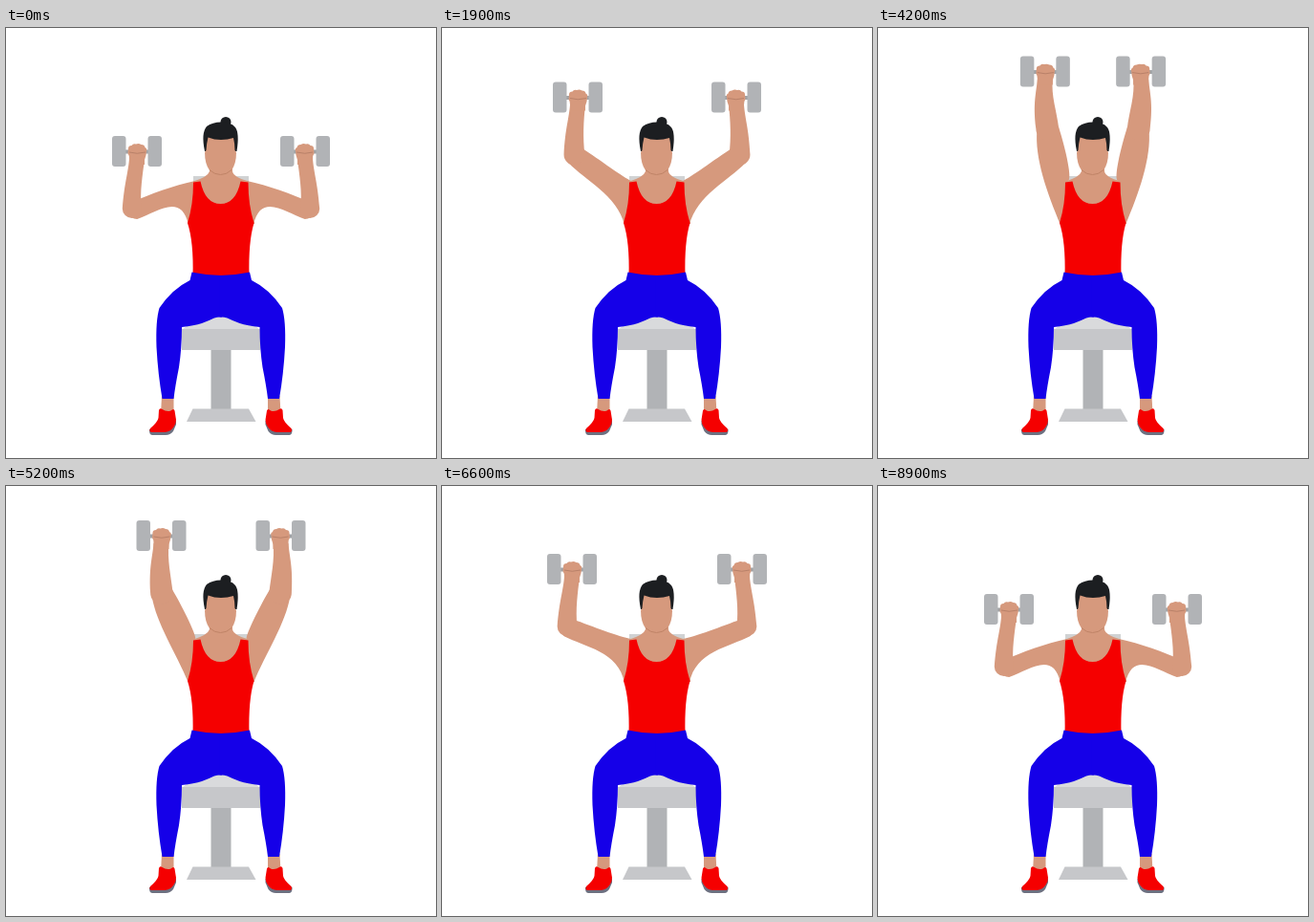
An HTML page for the animation above (9000 ms loop, 450 by 450 pixels).

```html
<!DOCTYPE html>
<html lang="en">
<head>
<meta charset="utf-8">
<title>Seated shoulder press</title>
<style>
  html, body { margin: 0; width: 100%; height: 100%; overflow: hidden; background: #fff; }
  svg { display: block; width: 100vw; height: 100vh; }
  .skin { fill: #d6997d; }
  .red { fill: #f50000; }
  .blue { fill: #1500e8; }
  .hair { fill: #1c1e21; }
  .pale { fill: #d9dadc; }
  .grey { fill: #c6c7ca; }
  .steel { fill: #b1b3b6; }
</style>
</head>
<body>
<svg viewBox="0 0 450 450">
  <defs>
    <g id="leg">
      <path class="skin" d="M163 385H175.500V404H162Z"/>
      <path fill="#6d7080" d="M150 420Q149.500 425.500 153 426H167Q172 426 175 422L178 415V411L165 414Z"/>
      <path class="red" d="M160 400Q161 397 163.500 399Q168 402 172.500 400.500Q175.500 397.500 176.500 400.500L178 410Q178 414 175.500 417.500Q172 422.500 166 423H152Q149.500 422 151 419Q159 412 159.500 408Z"/>
      <path class="blue" d="M226 259Q209 258.500 194.500 255.500L192.500 264Q174 273 160.500 293Q156.500 306 157.500 334Q159 362 163.500 388H175.500Q177 375 181 355Q184 335 184 313Q197 311.500 205 309Q213 306 218 303.500Q222 302 226 302.500Z"/>
    </g>
    <g id="arm">
      <path id="upper" class="skin"/>
      <g id="lower">
        <rect x="-13" y="-1.500" width="26" height="4" fill="#a0a2a5"/>
        <rect class="steel" x="-26" y="-16" width="14.500" height="32" rx="3"/>
        <rect class="steel" x="11.500" y="-16" width="14.500" height="32" rx="3"/>
        <path id="fore" class="skin"/>
        <path class="skin" d="M-9 -3Q-9 -6 -5.500 -6Q-4 -8.500 -1 -7.500Q2 -8.500 4.500 -7Q8 -7 8.500 -4Q11 -3 10 0Q10 4 8 9V14H-8V8Q-8 4 -9.500 2Z"/>
        <path d="M-8 1Q0 3.500 9 1" fill="none" stroke="#b98169" stroke-width="1"/>
      </g>
    </g>
  </defs>

  <rect width="450" height="450" fill="#fff"/>
  <path fill="#d0d2d3" d="M196 155H254V250H196Z"/>
  <path class="steel" d="M214.500 336H235.500V400H214.500Z"/>
  <path class="grey" d="M195.500 398.500H254L261.500 412H189Z"/>
  <path class="pale" d="M184 316Q202 300 225 300T266 316Z"/>
  <path class="grey" d="M184 315H266V337H184Z"/>

  <path class="skin" d="M213 140V150Q211 156 196 160.500L190 205H260L254 160.500Q238 156 237 150V140Z"/>
  <use href="#arm"/>
  <use href="#arm" transform="matrix(-1 0 0 1 450 0)"/>

  <path class="red" d="M196 161.500L203.500 160.500Q208.500 184 224.500 184T245.500 160.500L253.500 161.500Q253.500 185 259.500 204Q253.500 224 254.500 260H195.500Q196.500 224 190 204Q196 185 196 161.500Z"/>
  <use href="#leg"/>
  <use href="#leg" transform="matrix(-1 0 0 1 449.500 0)"/>

  <ellipse class="hair" cx="230" cy="98.500" rx="5.500" ry="5.500"/>
  <path class="hair" d="M208 129Q204 110 210 103Q216 98.500 225 98.500Q235 98 240 104Q244.500 110 241.500 129Z"/>
  <path class="skin" d="M209.500 128Q210 120 211.500 114.500Q218 117 225 117Q232 117 238 115Q239.500 121 239.500 128L241 130Q241 142 236 149Q230 154 224.500 154Q219 154 213 149Q208 142 208 130Z"/>
  <path d="M213 148.500Q218 153.500 224.500 153.500T236 148.500" fill="none" stroke="#c08467" stroke-width="1"/>
</svg>
<script>
const LOOP = 9000, STEP = 100;

// time, dumbbell centre x, y
const keys = [
  [0, 137, 129], [1000, 133, 108.5], [1550, 136, 87], [1900, 142, 72.5],
  [3000, 166.5, 49.5], [3100, 168.5, 48.5], [4100, 175, 45.5],
  [5000, 167, 49.5], [5200, 162.5, 52], [6000, 144, 69.5], [6600, 136, 87],
  [7000, 133.6, 99.5], [7300, 133, 107.5], [8900, 137, 129], [9000, 137, 129]
];
const shoulder = { x: 187, y: 175 };
const [upper, lower, fore] = ['upper', 'lower', 'fore'].map(id => document.getElementById(id));

const slope = (i, c) => (keys[i + 1][c] - keys[i][c]) / (keys[i + 1][0] - keys[i][0]);

// Tangent that never overshoots; zero at turning points
function tangent(i, c) {
  if (i === 0 || i === keys.length - 1) return 0;
  const a = slope(i - 1, c), b = slope(i, c);
  return a * b <= 0 ? 0 : 2 * a * b / (a + b);
}

function sample(t, c) {
  let i = 0;
  while (i < keys.length - 2 && t >= keys[i + 1][0]) i++;
  const h = keys[i + 1][0] - keys[i][0], s = (t - keys[i][0]) / h, r = 1 - s;
  return keys[i][c] * (1 + 2 * s) * r * r + keys[i + 1][c] * s * s * (3 - 2 * s)
    + h * s * r * (tangent(i, c) * r - tangent(i + 1, c) * s);
}

function pose(t) {
  const hx = sample(t, 1), hy = sample(t, 2);
  const lean = (hx - 155) * 0.15;
  const ex = hx + lean, ey = hy + 60;
  const vx = shoulder.x - ex, vy = shoulder.y - ey, len = Math.hypot(vx, vy);
  // The arm fills out as it straightens overhead
  const raise = Math.max(0, vy / len) ** 2;
  const inner = 7.5 + 4 * raise;
  const tip = (12.5 + inner) / 2;
  // Point along the upper arm, offset towards its inner side
  const at = (k, side) =>
    `${(ex + vx * k + vy / len * side).toFixed(2)} ${(ey + vy * k - vx / len * side).toFixed(2)}`;

  upper.setAttribute('d', `M191 206C${at(0.95, 4 - 14 * raise)} ${at(0.4, -10 - 8 * raise)} ${at(0, -11.5)}`
    + `A${tip} ${tip} 0 0 1 ${at(0, inner)}`
    + `C${at(0.35, 10 + 6 * raise)} ${at(0.85, 13 + 6 * raise)} 198 160L206 180Z`);
  fore.setAttribute('d', `M-8 8C-9 22 -13 32 ${lean - 12.5} 60`
    + `A${tip} ${tip} 0 0 0 ${lean + inner} 60C${lean + inner - 2} 42 6 25 8 8Z`);
  lower.setAttribute('transform', `translate(${hx.toFixed(2)} ${hy.toFixed(2)})`);
}

function frame() {
  pose(Math.floor(performance.now() % LOOP / STEP) * STEP);
  requestAnimationFrame(frame);
}
frame();
</script>
</body>
</html>
```
